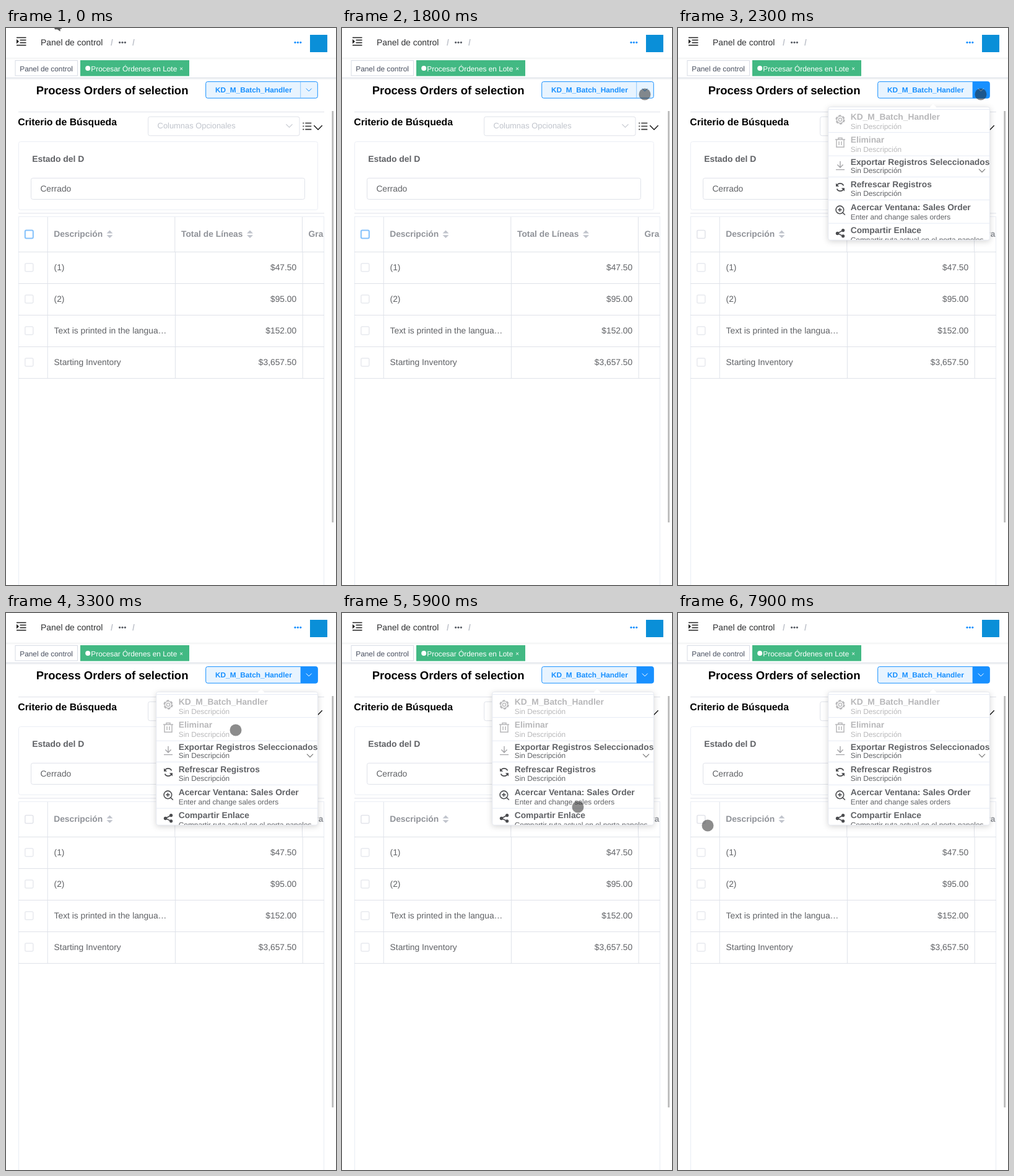
Animation of 533 by 899 pixels, one loop 8 s. Source, as an HTML page:

```html
<!DOCTYPE html>
<html lang="es">
<head>
<meta charset="utf-8">
<title>Procesar Órdenes en Lote</title>
<style>
  html, body { margin: 0; width: 100%; height: 100%; overflow: hidden; background: #fff; }
  svg { display: block; font-family: "Liberation Sans", Arial, sans-serif; text-rendering: geometricPrecision; }
  .card { filter: drop-shadow(0 2px 5px rgba(0, 0, 0, .16)); }
</style>
</head>
<body>
<svg id="stage" width="533" height="899" viewBox="0 0 533 899"></svg>
<script>
const LOOP = 8000, STEP = 100, OPEN = 2000;
const BLUE = '#1890ff', TEXT = '#606266', MUTED = '#909399', PALE = '#c0c4cc';
const LINE = '#dfe2e9', SOFT = '#ebeef5', OFF = '#b8b8ba';

const text = (x, y, size, fill, str, extra = '') =>
  `<text x="${x}" y="${y}" font-size="${size}" fill="${fill}" ${extra}>${str}</text>`;
const bold = (x, y, size, fill, str) => text(x, y, size, fill, str, 'font-weight="bold"');
const rect = (x, y, w, h, fill, stroke = 'none', r = 0, extra = '') =>
  `<rect x="${x}" y="${y}" width="${w}" height="${h}" rx="${r}" fill="${fill}" stroke="${stroke}" ${extra}/>`;
const path = (d, stroke, width = 1, fill = 'none') =>
  `<path d="${d}" stroke="${stroke}" stroke-width="${width}" fill="${fill}"/>`;
const shape = (d, fill) => path(d, 'none', 0, fill);
const circle = (x, y, r, fill) => `<circle cx="${x}" cy="${y}" r="${r}" fill="${fill}"/>`;
const dots = (x, y, fill) => [0, 4.4, 8.8].map(d => circle(x + d, y, 1.6, fill)).join('');
const caret = (x, y) =>
  shape(`M${x - 5} ${y - 1.6}h10l-5-4.8zM${x - 5} ${y + 1.2}h10l-5 4.8z`, PALE);
const checkbox = (y, stroke, width, id = '') =>
  rect(30.8, y - 6.4, 13, 13, '#fff', stroke, 2, `stroke-width="${width}" ${id}`);

function header() {
  return rect(0, 48, 533, 1, '#f0f1f3') + rect(0, 49, 533, 2, '#fafafa') +
    path('M17 15.5h15.5M22.5 19.5h10M22.5 23.7h10M17 27.7h15.5', '#222', 1.5) +
    shape('M17 18v7.4l4-3.7z', '#222') +
    text(56, 28, 13.9, '#303133', 'Panel de control') +
    bold(169, 28, 13.8, PALE, '/') + dots(183.6, 23.3, '#5a5e66') + bold(204, 28, 13.8, PALE, '/') +
    dots(467, 23.3, BLUE) + rect(491, 11, 28, 28, '#0a8fd8') +
    rect(15, 52.5, 100.5, 24.5, '#fff', '#d8dce5') +
    text(22.3, 70, 11.85, '#495060', 'Panel de control') +
    rect(120, 52, 176, 25.6, '#42b983') + circle(132.2, 65, 4, '#fff') +
    text(137.3, 70, 11.85, '#fff', 'Procesar Órdenes en Lote') +
    text(280.3, 69, 10, '#fff', '×') +
    rect(0, 80, 533, 1.3, '#d8dce5') + rect(0, 81.3, 533, 2, '#f4f5f7');
}

function toolbar() {
  return bold(48.7, 107, 18.5, '#000', 'Process Orders of selection') +
    rect(322.7, 86.6, 180.6, 26.6, '#e8f4ff', BLUE, 3) +
    path('M475.7 87v26', '#8cc8ff') +
    shape('M476 86.6h24.3q3 0 3 3v20.6q0 3-3 3H476z" id="arrow', BLUE) +
    '<g id="chevron">' + path('M484.8 97.6l4.4 4.4 4.4-4.4', 'currentColor') + '</g>' +
    bold(338, 104, 11.85, BLUE, 'KD_M_Batch_Handler') +
    path('M20 135.5h494M20 299h494', LINE) +
    bold(19.3, 157, 15.8, '#000', 'Criterio de Búsqueda') +
    rect(229.6, 143.2, 244.4, 30.6, '#fff', LINE, 3) +
    text(244.6, 162, 12.9, PALE, 'Columnas Opcionales') +
    path('M452.5 155.3l5 5 5-5', PALE, 1.1) +
    path('M483.3 153.5h10M483.3 158.5h10M483.3 163.6h10', '#333', 1.7) +
    path('M479.3 153.5h2M479.3 158.5h2M479.3 163.6h2', '#333', 1.7) +
    path('M497.3 157.2l6.7 6.7 6.7-6.7', '#111', 1.4) +
    rect(20.5, 183.5, 483, 110, '#fff', SOFT, 3) +
    bold(42.2, 216, 13.9, TEXT, 'Estado del D') +
    rect(40.5, 242.3, 442, 34.2, '#fff', LINE, 3) +
    text(55.4, 264, 13.8, TEXT, 'Cerrado');
}

function table() {
  const rows = [['(1)', '$47.50'], ['(2)', '$95.00'],
    ['Text is printed in the langua…', '$152.00'], ['Starting Inventory', '$3,657.50']];
  return path('M20.5 899V304.5h493V899', SOFT, 1.2) +
    path('M67.2 305v260.5M272.8 305v56.5M273.4 361.5v204M478.5 305v56.5M479.2 361.5v204M20 361.5h494', LINE) +
    checkbox(333, '#e2e4ea', 1.5, 'id="all"') +
    bold(77.2, 337.4, 13.8, MUTED, 'Descripción') + caret(167.5, 333) +
    bold(283, 337.4, 13.8, MUTED, 'Total de Líneas') + caret(394, 333) +
    bold(488.6, 337.4, 13.8, MUTED, 'Gra') +
    rows.map(([name, total], i) => {
      const y = 386.5 + 51 * i;
      return checkbox(y, '#e8eaef', 1.5) + text(77.6, y + 4.8, 13.8, TEXT, name) +
        text(469.2, y + 4.8, 13.8, TEXT, total, 'text-anchor="end"') +
        path(`M20 ${y + 26}h494`, LINE);
    }).join('') +
    rect(526.3, 134, 2.8, 664, '#bababa');
}

// Icons are drawn around their own centre.
const icons = [
  c => `<circle r="6.4" fill="none" stroke="${c}" stroke-width="2.6" stroke-dasharray="3.9 2.8"/>` +
    `<circle r="5.6" fill="none" stroke="${c}" stroke-width="1.3"/>` +
    `<circle r="2.6" fill="none" stroke="${c}" stroke-width="1.4"/>`,
  c => path('M-8-5H8M-3-5.5V-7.5H3V-5.5M-6-5V7.3H6V-5M-2-2V4M2-2V4', c, 1.5),
  c => path('M0-7V3M-4.6-1.4L0 3.2 4.6-1.4M-7 6.6H7', c, 1.4),
  c => path('M-5.6-2.4A6 6 0 0 1 5.4-2.6M5.6 2.4A6 6 0 0 1-5.4 2.6', c, 1.7) +
    shape('M-7-6.4V-1.2H-1.8zM7 6.4V1.2H1.8z', c),
  c => `<circle cx="-.6" cy="-.6" r="6.3" fill="none" stroke="${c}" stroke-width="1.6"/>` +
    path('M4 4l3.8 3.8M-3.8-.6h6.4M-.6-3.8v6.4', c, 1.6),
  c => path('M4.5-4.5L-4.5.5 4.5 4.8', c, 1.5) +
    circle(4.6, -4.4, 2.6, c) + circle(-4.5, .5, 2.7, c) + circle(4.6, 4.8, 2.6, c)
];

function menu() {
  const none = 'Sin Descripción';
  const items = [ // title, description, title baseline, description baseline, icon centre
    ['KD_M_Batch_Handler', none, 148, 163, 148],
    ['Eliminar', none, 185.2, 200, 185],
    ['Exportar Registros Seleccionados', none, 221, 234, 222],
    ['Refrescar Registros', none, 257, 271, 257],
    ['Acercar Ventana: Sales Order', 'Enter and change sales orders', 294, 309, 294],
    ['Compartir Enlace', 'Compartir ruta actual en el porta papeles', 331, 345.5, 331]
  ];
  return '<clipPath id="clip"><rect x="243" y="120" width="260.4" height="222"/></clipPath><g id="menu">' +
    rect(242.8, 127.5, 260.6, 214.8, '#fff', '#e6e9f0', 3, 'class="card"') +
    shape('M406.5 128.2l5.5-5.7 5.5 5.7z', '#fff') + '<g clip-path="url(#clip)">' +
    path('M243 131.5h260M243 168.5h260M243 206.3h260M243 240.4h260M243 277.5h260M243 315.2h260', '#e6ebf5') +
    items.map(([title, info, y1, y2, yi], i) => {
      const off = i < 2, c = off ? OFF : TEXT;
      return `<g transform="translate(262 ${yi})">${icons[i](off ? OFF : i < 3 ? '#a5a5a8' : '#4c4d50')}</g>` +
        bold(278.7, y1, 13.8, c, title) + text(278.8, y2, 11.85, c, info);
    }).join('') +
    path('M486 227.6l5 5 5-5', '#777', 1.1) + '</g></g>';
}

const stage = document.getElementById('stage');
stage.innerHTML = header() + toolbar() + table() + menu() +
  '<g id="pointer">' + shape('M78 0H90V1.2H87.6V5.5L83 2.2H79z', '#555') + '</g>' +
  '<circle id="touch" r="9.5" fill="#222" opacity=".52"/>';
const [arrow, chevron, all, menuBox, pointer, touch] =
  ['arrow', 'chevron', 'all', 'menu', 'pointer', 'touch'].map(id => document.getElementById(id));

// Each stroke: start time, then one position per step.
const strokes = [
  [700, [165, 18], [295, 60], [365, 81]],
  [1100, [405, 97], [452, 110], [480, 113], [488, 114], [491, 112], [491, 110], [490, 108], [489, 107]],
  [2900, [332, 154]],
  [3300, [371, 189], [371, 190]],
  [3800, [372, 206], [373, 223], [374, 233]],
  [4300, [373, 239], [375, 251], [377, 260]],
  [4900, [378, 276], [379, 289]],
  [5200, [376, 292], [378, 297], [381, 302], [384, 305], [385, 307]],
  [5800, [383, 315], [381, 313]],
  [7200, [372, 332], [340, 382], [294, 420], [238, 431], [178, 420], [122, 392], [76, 362], [48, 343]]
];

function touchAt(t) {
  const stroke = strokes.findLast(s => t >= s[0]);
  return stroke && stroke[Math.min(stroke.length - 1, 1 + Math.floor((t - stroke[0]) / STEP))];
}

// cubic-bezier(.23, 1, .32, 1)
function easeOut(p) {
  let lo = 0, hi = 1;
  for (let i = 0; i < 20; i++) {
    const u = (lo + hi) / 2, v = 1 - u;
    if (.69 * u * v * v + .96 * u * u * v + u * u * u < p) lo = u; else hi = u;
  }
  return 1 - (1 - lo) ** 3;
}

function draw(now) {
  const t = Math.floor(now % LOOP / STEP) * STEP;
  const open = t >= OPEN, pos = touchAt(t);
  const grow = open ? easeOut(Math.min(1, (t - OPEN + 35) / 300)) : 0;

  arrow.style.display = open ? '' : 'none';
  chevron.style.color = open ? '#fff' : BLUE;
  all.style.stroke = open ? '#e2e4ea' : '#84c1fb';
  all.style.strokeWidth = open ? 1.5 : 2;

  menuBox.style.display = open ? '' : 'none';
  menuBox.setAttribute('opacity', grow);
  menuBox.setAttribute('transform', `translate(0 127) scale(1 ${grow}) translate(0 -127)`);

  pointer.style.display = pos ? 'none' : '';
  touch.style.display = pos ? '' : 'none';
  if (pos) touch.setAttribute('transform', `translate(${pos})`);
  requestAnimationFrame(draw);
}
requestAnimationFrame(draw);
</script>
</body>
</html>
```
